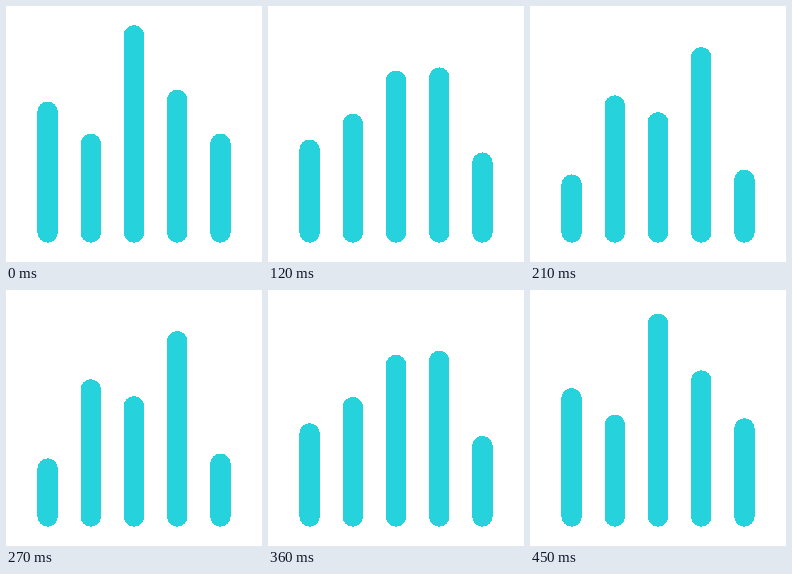
Animation of 256x256 px, one loop 0.48 s. Source, as an HTML page:

```html
<!DOCTYPE html>
<html lang="en">
<head>
<meta charset="utf-8">
<title>Equalizer</title>
<style>
  html, body { margin: 0; width: 100%; height: 100%; overflow: hidden; background: #fff; }
  svg { display: block; width: 100vw; height: 100vh; }
</style>
</head>
<body>
<svg id="stage" viewBox="0 0 256 256" fill="#26d2dc" shape-rendering="crispEdges"></svg>
<script>
const LOOP = 480, STEP = 30;
const WIDTH = 20.5, GAP = 43.2, BOTTOM = 236.7;

// Top edge of each bar: start, middle and end of the loop
const tops = [
  [95.6, 171.6, 94.8],
  [127.6, 87.6, 126.2],
  [19.2, 110, 19.6],
  [83.6, 39.2, 82.2],
  [127.6, 165.3, 126.6]
];

const stage = document.getElementById("stage");
const bars = tops.map((_, i) => {
  const bar = document.createElementNS("http://www.w3.org/2000/svg", "rect");
  bar.setAttribute("x", 128 + (i - 2) * GAP - WIDTH / 2);
  bar.setAttribute("width", WIDTH);
  bar.setAttribute("rx", WIDTH / 2);
  return stage.appendChild(bar);
});

const ease = u => u * u * (3 - 2 * u);
const mix = (a, b, u) => a + (b - a) * u;

function draw(time) {
  const t = Math.floor((time % LOOP) / STEP) * STEP;
  const phase = t / LOOP * 2;
  const half = Math.floor(phase);
  const u = ease(phase - half);
  bars.forEach((bar, i) => {
    const y = mix(tops[i][half], tops[i][half + 1], u);
    bar.setAttribute("y", y);
    bar.setAttribute("height", BOTTOM - y);
  });
}

const start = performance.now();
function tick() {
  draw(performance.now() - start);
  requestAnimationFrame(tick);
}
tick();
</script>
</body>
</html>
```
